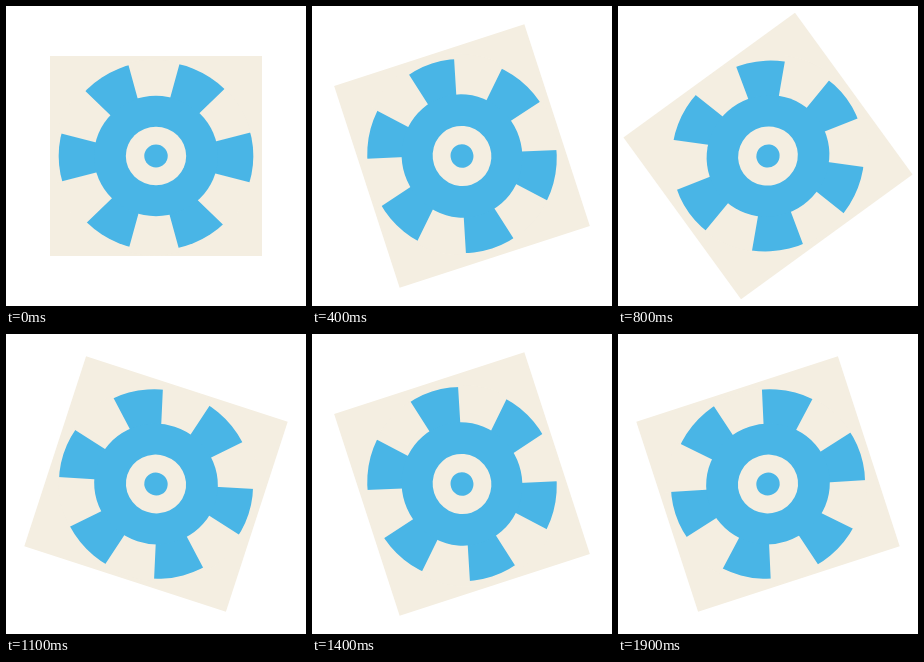
Write an HTML page that moves like this. It is 300x300 px and loops after 2000 ms.

```html
<!DOCTYPE html>
<html lang="en">
<head>
<meta charset="utf-8">
<title>Turning gear</title>
<style>
  html, body { margin: 0; width: 100%; height: 100%; overflow: hidden; background: #fff; }
  svg { display: block; width: 100vw; height: 100vh; }
  .paper { fill: #f4eee1; }
  .blue { fill: #49b5e6; }
  .gaps { fill: none; stroke: #f4eee1; stroke-width: 43; stroke-dasharray: 1 1; stroke-dashoffset: -.5; }
</style>
</head>
<body>
<svg viewBox="0 0 300 300">
  <g id="spinner">
    <rect class="paper" x="-106" y="-100" width="212" height="200"/>
    <!-- the gear is slightly wider than tall, its gaps are cut a little off centre -->
    <g transform="scale(1.03 1)">
      <circle class="blue" r="94.5"/>
      <circle class="gaps" cx="-2.1" cy="1.5" r="76.5" pathLength="12"/>
      <circle class="blue" r="60.2"/>
      <circle class="paper" r="29.3"/>
      <circle class="blue" r="11.4"/>
    </g>
  </g>
</svg>
<script>
  const LOOP = 2000, STEP = 100;
  const spinner = document.getElementById('spinner');

  function draw() {
    const step = Math.floor((performance.now() % LOOP) / STEP);
    const angle = step * STEP / LOOP * 360;
    spinner.setAttribute('transform', `translate(150 150) rotate(${angle})`);
    requestAnimationFrame(draw);
  }
  draw();
</script>
</body>
</html>
```
